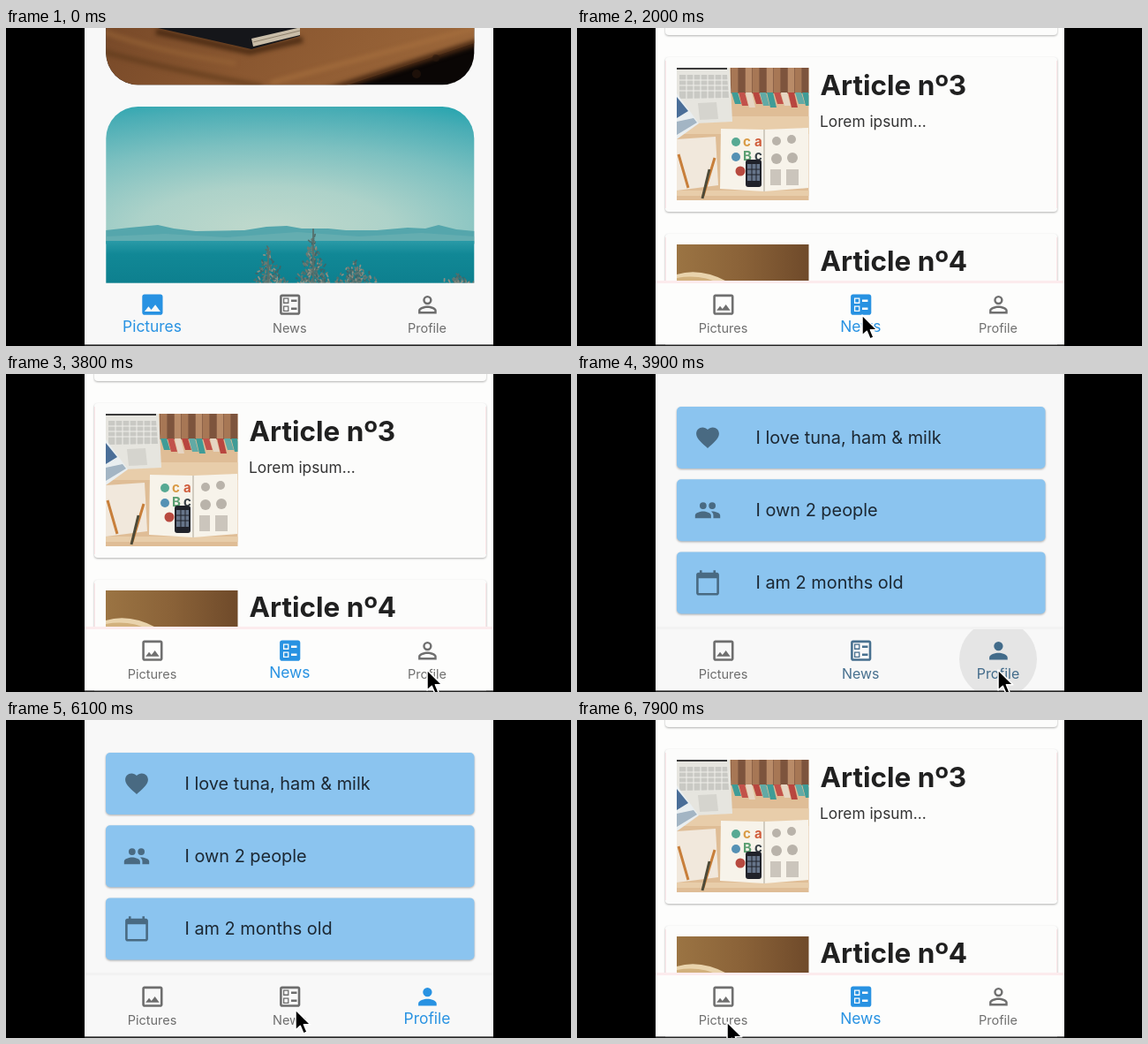
An HTML page that plays this animation: 640 by 360 pixels, repeating every 8000 ms.

```html
<!DOCTYPE html>
<html lang="en">
<head>
<meta charset="utf-8">
<title>Bottom navigation</title>
<style>
  html, body { margin: 0; width: 100%; height: 100%; overflow: hidden; background: #000; }
  svg { display: block; width: 640px; height: 360px; font-family: Inter, sans-serif; }
  .card { filter: drop-shadow(0 1px 1px rgba(0, 0, 0, .3)); }
  .blur { filter: blur(2.5px); }
  .soft { filter: blur(.6px); }
  .title { font-size: 31.5px; font-weight: 700; fill: #202020; }
  .body { font-size: 17.3px; fill: #333; }
  .row { font-size: 19.9px; fill: #1c2833; }
  .tab { text-anchor: middle; }
</style>
</head>
<body>
<svg viewBox="0 0 640 360">
  <defs>
    <radialGradient id="sky" gradientUnits="userSpaceOnUse" cx="0" cy="0" r="1" gradientTransform="translate(295 228) scale(480 160)">
      <stop offset="0" stop-color="#c0d9cc"/><stop offset=".3" stop-color="#add2c9"/>
      <stop offset=".6" stop-color="#7cc0c0"/><stop offset=".85" stop-color="#49adb5"/>
      <stop offset="1" stop-color="#20a3ae"/>
    </radialGradient>
    <linearGradient id="sea" x2="0" y2="1">
      <stop offset="0" stop-color="#2a9aa7"/><stop offset=".3" stop-color="#118896"/><stop offset="1" stop-color="#0d7f8e"/>
    </linearGradient>
    <linearGradient id="wood" x2="1" y2=".15">
      <stop offset="0" stop-color="#764828"/><stop offset=".45" stop-color="#8a5730"/><stop offset="1" stop-color="#9c673a"/>
    </linearGradient>
    <linearGradient id="cafe" x2="1">
      <stop offset="0" stop-color="#9b7443"/><stop offset=".5" stop-color="#8a6238"/><stop offset="1" stop-color="#6f4a2a"/>
    </linearGradient>
    <clipPath id="photo1"><rect x="113.300" y="-80" width="417" height="144.300" rx="36"/></clipPath>
    <clipPath id="photo2"><rect x="113.300" y="89" width="417" height="280" rx="36"/></clipPath>
    <clipPath id="thumb"><rect x="113" y="45" width="149.500" height="150"/></clipPath>
    <clipPath id="bar"><rect x="89" y="289" width="463" height="69"/></clipPath>
  </defs>

  <rect id="paper" x="89" width="463" height="358.500"/>

  <g class="page">
    <g clip-path="url(#photo1)">
      <path fill="#0a0605" d="M113 0H531V65H113z"/>
      <path class="soft" fill="url(#wood)" d="M100 -10H540V14L385 65V80H100z"/>
      <g class="blur" fill="none">
        <path stroke="#4a2a14" stroke-width="7" d="M540 14L360 72"/>
        <path stroke="#a9713f" stroke-width="5" opacity=".7" d="M540 -2L300 62"/>
        <path stroke="#5b3719" stroke-width="6" opacity=".6" d="M100 24Q170 44 290 66"/>
        <path stroke="#9a6638" stroke-width="6" opacity=".6" d="M110 4Q170 26 260 40"/>
        <path stroke="#422510" stroke-width="7" opacity=".8" d="M170 4L276 27L336 13"/>
      </g>
      <path fill="#15161a" d="M172 0L278 24L333 9V0z"/>
      <path fill="#c9bda8" d="M278 12L330 0H333V8L280 21z"/>
      <path fill="none" stroke="#8d806c" d="M280 16L333 3"/>
      <g class="soft" fill="#2a180d" opacity=".6"><circle cx="487" cy="34" r="4"/><circle cx="465" cy="52" r="5"/></g>
    </g>
    <g clip-path="url(#photo2)">
      <rect x="113" y="89" width="418" height="156" fill="url(#sky)"/>
      <path class="soft" fill="#55a6ac" d="M113 229L140 226L172 223L190 227L215 230L270 229L295 225L318 224L335 227L365 227L385 229L420 229L455 226L475 227L490 223L510 228L531 230V244H113z"/>
      <path class="soft" fill="#73b4b5" opacity=".5" d="M113 236L180 233L250 237L330 231L400 236L470 232L531 236V241H113z"/>
      <rect x="113" y="241" width="418" height="50" fill="url(#sea)"/>
      <g id="trees" class="soft" stroke-width="1.800" stroke-linecap="round"></g>
    </g>
  </g>

  <g class="page">
    <g class="card" fill="#fcfcfb">
      <rect x="100" y="-40" width="444" height="48" rx="4"/>
      <rect x="100" y="33" width="444" height="175" rx="4"/>
      <rect x="100" y="233" width="444" height="175" rx="4"/>
    </g>
    <path fill="none" stroke="#fbe6e8" d="M100.500 37V204M543.500 37V204M100.500 237V288M543.500 237V288"/>
    <g clip-path="url(#thumb)">
      <path fill="#dfbd96" d="M113 45H263V195H113z"/>
      <path fill="#e8cdaa" d="M113 100H263V120H113zM113 184H263V190H113z"/>
      <path fill="#8d6248" d="M174 45H263V74H174z"/>
      <g id="books"></g>
      <path fill="#e6e5df" d="M113 45H173L176 106L113 109z"/>
      <path fill="#c9c9c4" d="M116 53H170L172 79L116 80z"/>
      <path fill="none" stroke="#f0efea" d="M116 59H171M116 65H171M116 71H172M124 53V80M132 53V80M140 53V80M148 53V80M156 53V80M164 53V80"/>
      <path fill="#d5d4ce" d="M137 85L158 84L160 103L139 104z"/>
      <path fill="#3b3b3b" d="M113 45H170V47H113z"/>
      <path fill="#e9eef0" d="M113 74L138 108L113 126z"/>
      <path fill="#4a6e98" d="M113 78L126 94L113 102z"/>
      <path fill="#a3b5c4" d="M113 106L132 102L136 107L113 121z"/>
      <path fill="#f1e8dc" d="M113 126L157 123L160 178L113 184z"/>
      <path fill="none" stroke="#c87f3b" stroke-width="3" d="M115 143L126 181M156 147L143 190"/>
      <path fill="none" stroke="#4d4a38" stroke-width="3" d="M150 160L142 193"/>
      <path fill="#f7f3ea" d="M163 114L212 115L262 113V181L212 185L162 182z"/>
      <path fill="none" stroke="#d2ccc0" stroke-width="2" d="M212 115V185"/>
      <g fill="#b9b3aa"><circle cx="226" cy="128" r="5"/><circle cx="243" cy="126" r="5"/><circle cx="226" cy="148" r="6"/><circle cx="244" cy="147" r="6"/>
        <path d="M219 160H231V178H219zM237 160H251V178H237z" opacity=".7"/></g>
      <circle cx="180" cy="129" r="5" fill="#57a993"/>
      <circle cx="180" cy="146" r="5" fill="#5591b4"/>
      <circle cx="185" cy="162" r="5.500" fill="#b84a40"/>
      <g font-size="15" font-weight="700">
        <text x="188" y="134" fill="#d99b45">c</text><text x="201" y="134" fill="#d05c3b">a</text>
        <text x="188" y="150" fill="#5b9f71">B</text><text x="201" y="150" fill="#3a4248">c</text>
      </g>
      <rect x="191" y="149" width="18" height="31" rx="3" fill="#20222a"/>
      <path fill="#66758a" d="M193 154H207V173H193z"/>
      <path fill="none" stroke="#20222a" d="M193 160H207M193 166H207M198 154V173M203 154V173"/>
    </g>
    <path fill="url(#cafe)" d="M113 245H262.500V290H113z"/>
    <path fill="#e9d3ac" d="M113 279Q140 271 170 287V290H113z"/>
    <path fill="#d2b17d" d="M113 283Q140 278 163 290H113z"/>
    <text class="title" x="275.500" y="76">Article nº3</text>
    <text class="body" x="275" y="111.500">Lorem ipsum...</text>
    <text class="title" x="275.500" y="275">Article nº4</text>
  </g>

  <g class="page" id="profile"></g>

  <g id="nav">
    <rect id="navPaper" x="89" y="288.700" width="463" height="69.800"/>
    <rect id="navLine" x="89" y="286" width="463" height="3"/>
    <circle id="ripple" cy="323" r="44" clip-path="url(#bar)"/>
  </g>
  <path fill="#262626" d="M89 358.500H552V360H89z"/>
  <path id="cursor" fill="#000" stroke="#fff" stroke-width="1.500" stroke-linejoin="round"
    d="M0 0V23L5.300 18.200L9 27L13 25.200L9.400 16.800H16.800z"/>
</svg>
<script>
const LOOP = 8000, STEP = 100;
const $ = id => document.getElementById(id);
const clamp = v => Math.max(0, Math.min(1, v));
const mix = (a, b, p) => a + (b - a) * p;

function add(parent, name, attrs, text = '') {
  const el = document.createElementNS('http://www.w3.org/2000/svg', name);
  for (const key in attrs) el.setAttribute(key, attrs[key]);
  el.textContent = text;
  return parent.appendChild(el);
}
// 24-unit icon centred on x, y
const addIcon = (parent, d, x, y) => add(parent, 'path', {
  d, 'fill-rule': 'evenodd', transform: `translate(${x} ${y}) scale(1.29) translate(-12 -12)`
});

let seed = 7;
const random = () => (seed = seed * 16807 % 2147483647) / 2147483647;

// Trees: x, top, half width at the foot, twigs
for (const [x, top, half, count] of [[297, 249, 24, 130], [348, 232, 24, 190], [395, 265, 36, 130], [512, 279, 26, 50]]) {
  for (let i = 0; i < count; i++) {
    const depth = Math.sqrt(random()), side = random() + random() - 1;
    const px = x + side * half * depth, py = mix(top, 291, depth);
    add($('trees'), 'path', {
      d: `M${px} ${py}l${random() * 4 - 2} ${-random() * 3}`,
      stroke: ['#4f6f6d', '#6d7a72', '#8d8f84', '#3f6568', '#5f7673'][i % 5]
    });
  }
}
add($('trees'), 'path', { d: 'M348 228V290M297 250V290', stroke: '#56706c' });

// Book spines
for (let i = 0; i < 11; i++) {
  const x = 175 + i * 8;
  add($('books'), 'path', { d: `M${x} 45h7v28h-7z`, fill: ['#a77755', '#7d543d', '#b98b68'][i % 3] });
  add($('books'), 'path', {
    d: `M${x} 73h7l4 ${13 + i % 3 * 2}h-7z`,
    fill: ['#3f9c97', '#c2524a', '#e6d5c2', '#b8463f', '#62aaa5'][i % 5]
  });
}

const rows = [
  ['I love tuna, ham & milk', 'M12 21.350l-1.450-1.320C5.400 15.360 2 12.280 2 8.500 2 5.420 4.420 3 7.500 3c1.740 0 3.410.810 4.500 2.090C13.090 3.810 14.760 3 16.500 3 19.580 3 22 5.420 22 8.500c0 3.780-3.400 6.860-8.550 11.540z'],
  ['I own 2 people', 'M16 11a3 3 0 1 0 0-6a3 3 0 0 0 0 6zM8 11a3 3 0 1 0 0-6a3 3 0 0 0 0 6zM8 13c-2.330 0-7 1.170-7 3.500V19h14v-2.500c0-2.330-4.670-3.500-7-3.500zm8 0c-.290 0-.620.020-.970.050 1.160.840 1.970 1.970 1.970 3.450V19h6v-2.500c0-2.330-4.670-3.500-7-3.500z'],
  ['I am 2 months old', 'M20 3h-1V1h-2v2H7V1H5v2H4c-1.100 0-2 .9-2 2v16c0 1.100.9 2 2 2h16c1.100 0 2-.9 2-2V5c0-1.100-.9-2-2-2zm0 18H4V8h16v13z']
];
rows.forEach(([label, icon], i) => {
  const y = 37 + i * 82.2;
  add($('profile'), 'rect', { class: 'card', x: 113, y, width: 417.5, height: 70, rx: 5, fill: '#8bc4ef' });
  addIcon($('profile'), icon, 148, y + 35).setAttribute('fill', '#496a82');
  add($('profile'), 'text', { class: 'row', x: 202.5, y: y + 42 }, label);
});

const frame = 'M19 3H5c-1.100 0-2 .9-2 2v14c0 1.100.9 2 2 2h14c1.100 0 2-.9 2-2V5c0-1.100-.9-2-2-2z';
const hole = 'M5 5H19V19H5z';
const ballot = 'M13 7.500h5v2h-5zM13 14.500h5v2h-5zM6 6h5v5H6zM7 7h3v3H7zM6 13h5v5H6zM7 14h3v3H7z';
const tabs = [
  ['Pictures', 165.5, frame + 'M8.500 13.500l2.500 3.010L14.500 12l4.500 6H5z', frame + hole + 'M14.140 11.860l-3 3.870L9 13.140 6 17h12z'],
  ['News', 321.3, frame + ballot, frame + hole + ballot],
  ['Profile', 477, 'M12 12a4 4 0 1 0 0-8a4 4 0 0 0 0 8zm0 2c-2.670 0-8 1.340-8 4v2h16v-2c0-2.660-5.330-4-8-4z',
    'M12 12a4 4 0 1 0 0-8a4 4 0 0 0 0 8zM12 10.100a2.100 2.100 0 1 0 0-4.200a2.100 2.100 0 0 0 0 4.200zM12 13c-2.670 0-8 1.340-8 4v3h16v-3c0-2.660-5.330-4-8-4zM12 14.900c2.970 0 6.100 1.460 6.100 2.100v1.100H5.900V17c0-.640 3.130-2.100 6.100-2.100z']
].map(([label, x, on, off]) => ({
  x, on, off,
  icon: addIcon($('nav'), off, x + 0.4, 313.2),
  text: add($('nav'), 'text', { class: 'tab', x }, label)
}));

const pages = document.querySelectorAll('.page');
const papers = ['#f8f8f8', '#fdfdfc', '#f8f8f8'];
const lines = ['none', '#fcebed', '#f2f2f2'];
const taps = [[-1000, 0], [1700, 1], [3800, 2], [6200, 1]];

// Pointer visits: enter, arrive, start leaving, gone, edge point, resting point
const visits = [
  [800, 1600, 2100, 2200, [455, 356], [323, 325]],
  [2800, 3300, 4500, 4700, [450, 358], [477, 335]],
  [5300, 5600, 6900, 7100, [475, 352], [328, 328]],
  [7500, 7900, 8000, 8100, [474, 354], [170, 342]]
];

function drawTabs(t) {
  const k = taps.findLastIndex(([time], i) => !i || time < t);
  const [time, current] = taps[k], previous = k ? taps[k - 1][1] : current;
  const since = t - time, p = clamp(since / 200);
  pages.forEach((page, i) => page.style.display = i === current ? '' : 'none');
  $('paper').style.fill = $('navPaper').style.fill = papers[current];
  $('navLine').style.fill = lines[current];
  tabs.forEach((tab, i) => {
    const w = i === current ? p : i === previous ? 1 - p : 0;
    const color = `rgba(${40 * w}, ${146 * w}, ${226 * w}, ${mix(0.56, 1, w)})`;
    tab.icon.setAttribute('d', i === current ? tab.on : tab.off);
    tab.icon.style.fill = tab.text.style.fill = color;
    tab.text.style.fontSize = mix(14.5, 17.4, w) + 'px';
    tab.text.setAttribute('y', mix(345, 344.2, w));
  });
  $('ripple').setAttribute('cx', tabs[current].x);
  $('ripple').style.opacity = 0.08 * clamp((300 - since) / 200);
}

function drawCursor(t) {
  const visit = visits.find(v => t >= v[0] && t < v[3]);
  $('cursor').style.display = visit ? '' : 'none';
  if (!visit) return;
  const [enter, arrive, leave, gone, edge, rest] = visit;
  const coming = 1 - (1 - clamp((t - enter) / (arrive - enter))) ** 2;
  const p = coming - clamp((t - leave) / (gone - leave));
  $('cursor').setAttribute('transform', `translate(${mix(edge[0], rest[0], p)} ${mix(edge[1], rest[1], p)})`);
}

function draw(now) {
  const t = Math.floor(now % LOOP / STEP) * STEP;
  drawTabs(t);
  drawCursor(t);
  requestAnimationFrame(draw);
}
draw(performance.now());
</script>
</body>
</html>
```
